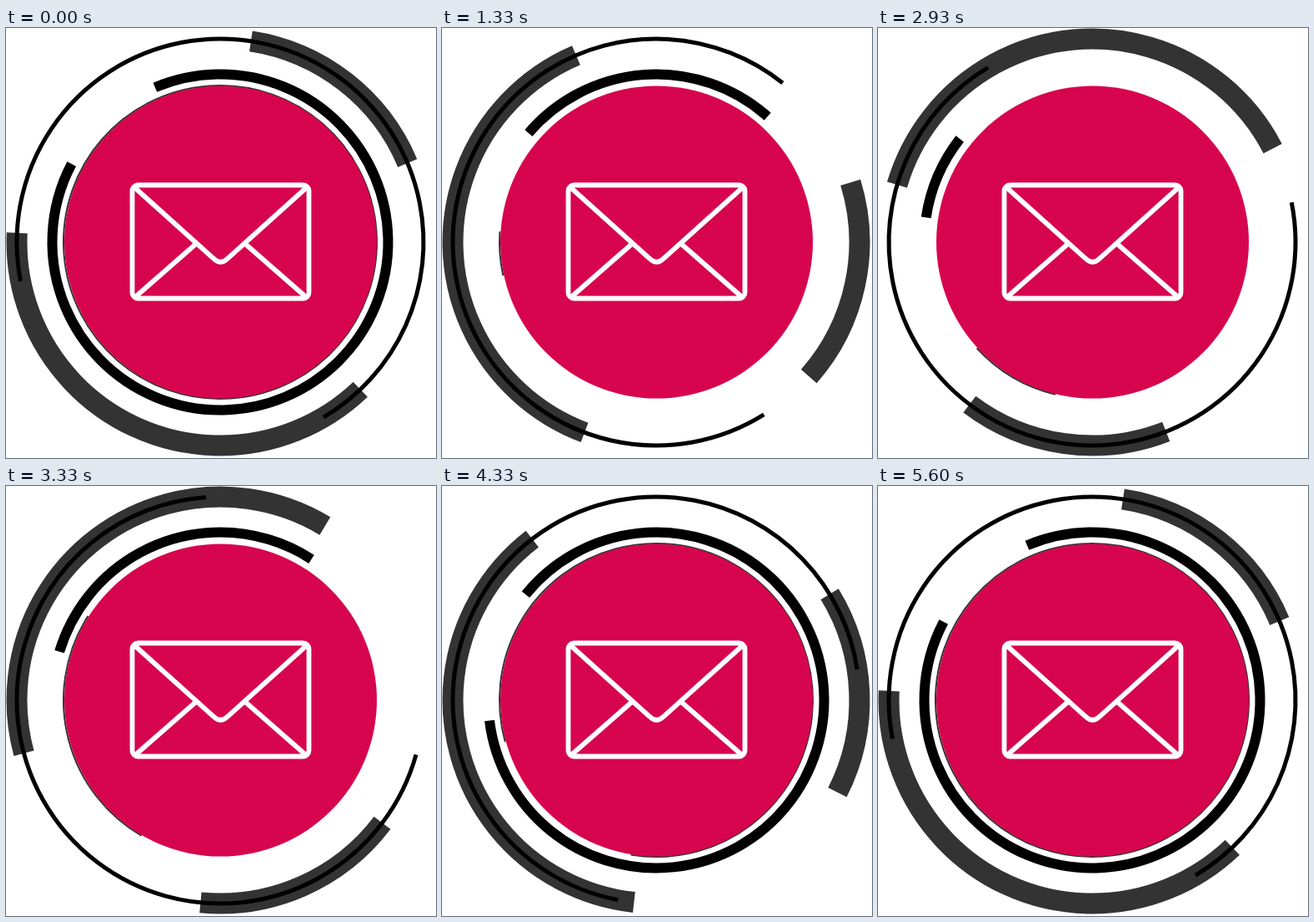
Write an HTML page with a canvas that moves like this. It is 516 px wide and 516 px high and loops after 5.63 s.

```html
<!DOCTYPE html>
<html lang="en">
<head>
<meta charset="utf-8">
<title>Mail badge</title>
<style>
  html, body { margin: 0; width: 100%; height: 100%; overflow: hidden; background: #fff; }
  canvas { display: block; width: 516px; height: 516px; }
</style>
</head>
<body>
<canvas id="stage" width="516" height="516"></canvas>
<script>
const ctx = document.getElementById('stage').getContext('2d');
const LOOP = 5630, END = 5600, TURN = 2945;
const CENTER = 257;

// Cubic from 0 to 1 with the given slopes at its ends.
const ease = (s, from = 0, to = 0) =>
  s * s * (3 - 2 * s) + from * s * (1 - s) ** 2 - to * s * s * (1 - s);

const progress = (t, start, end) => Math.min(1, Math.max(0, (t - start) / (end - start)));

// 0 at rest, 1 at the turning point; each direction has its own end slopes.
function swing(t, there, back) {
  return t < TURN ? ease(t / TURN, ...there) : ease(1 - progress(t, TURN, END), ...back);
}

// Length of an arc that closes to a stub, then opens again.
function trim(t, full, stub, closed, opening, open) {
  const shut = ease(progress(t, 0, closed)) - ease(progress(t, opening, open));
  return full - (full - stub) * shut;
}

// Angles in degrees, clockwise from the top.
function arc(radius, width, color, start, length) {
  const rad = deg => (deg - 90) * Math.PI / 180;
  ctx.beginPath();
  ctx.arc(CENTER, CENTER, radius, rad(start), rad(start + length));
  ctx.lineWidth = width;
  ctx.strokeStyle = color;
  ctx.stroke();
}

const envelope = new Path2D(
  'M155 192 L249 276.5 Q257.5 285 266 276.5 L360 192 M156 322 L228 259 M359 322 L287 259');
envelope.roundRect(151.5, 188.5, 212, 136, 7);

function draw(t) {
  const linear = swing(t, [1, 1], [1, 1]);
  const bandTurn = 150 * swing(t, [0, 0], [0.34, 1.5]);
  const lineTurn = -180 * swing(t, [1.1, -0.35], [0.12, 0.87]);

  ctx.clearRect(0, 0, 516, 516);
  arc(244, 25, '#333', 8.7 + bandTurn, 58.4);
  arc(244, 25, '#333', 136.4 + bandTurn, 136.2);
  arc(244, 5, '#000', 259 + lineTurn, 250.5);
  arc(201.5, 12, '#000', 337.2 - 59 * linear, trim(t, 320.6, 10, 2000, 2650, 4490));
  arc(188, 2, '#333', 311 - 118 * linear, trim(t, 360, 16, 1350, 2600, 5000));

  ctx.beginPath();
  ctx.arc(CENTER + 0.5, CENTER, 187.5, 0, 2 * Math.PI);
  ctx.fillStyle = '#d7054e';
  ctx.fill();

  ctx.lineWidth = 5.8;
  ctx.strokeStyle = '#fff';
  ctx.stroke(envelope);
}

const began = performance.now();
function tick() {
  draw((performance.now() - began) % LOOP);
  requestAnimationFrame(tick);
}
tick();
</script>
</body>
</html>
```
